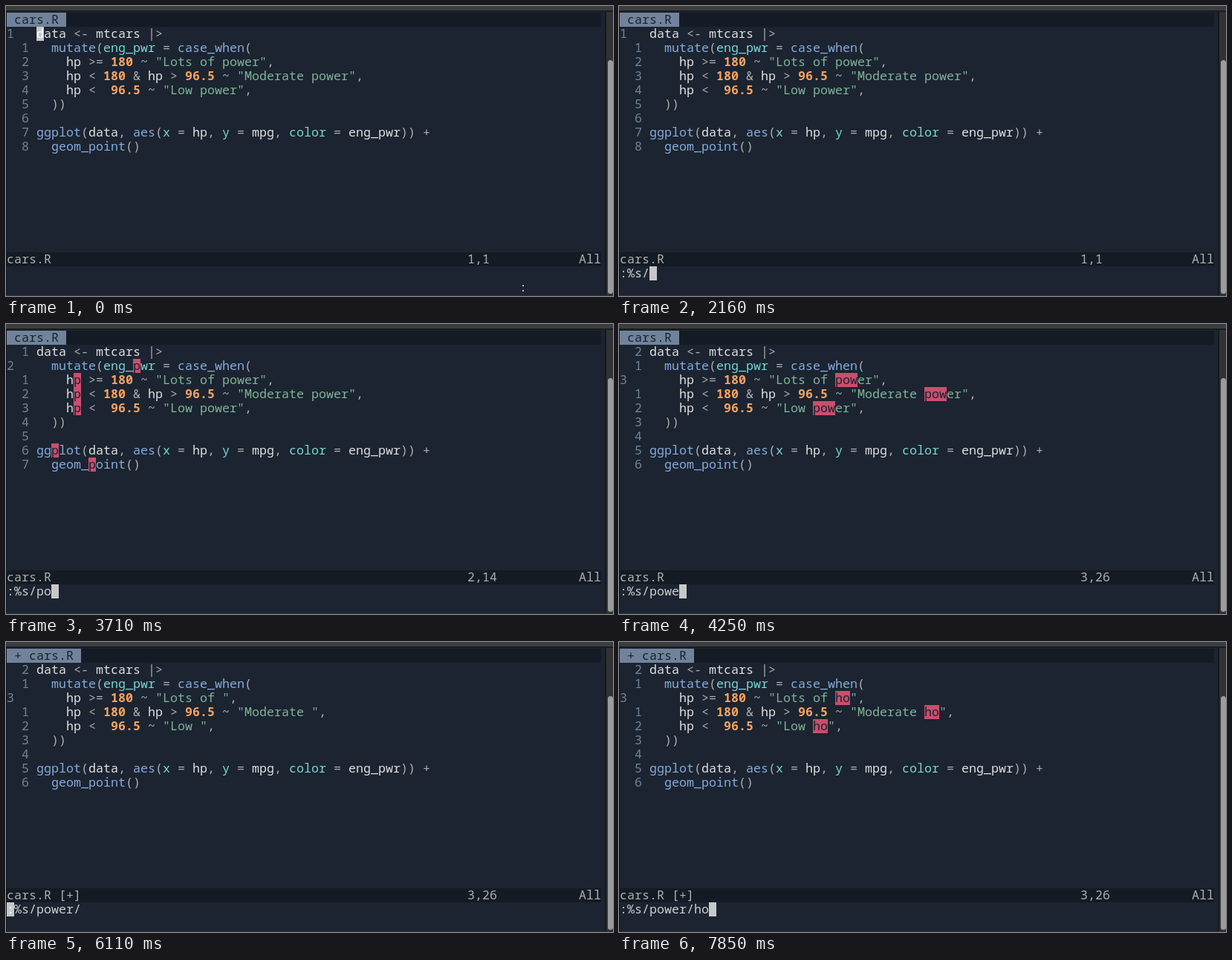
Write an HTML page with a canvas that moves like this. It is 817 px wide and 391 px high and loops after 8 s.

```html
<!DOCTYPE html>
<html lang="en">
<head>
<meta charset="utf-8">
<title>Substitute preview</title>
<style>
html, body { margin: 0; width: 100%; height: 100%; overflow: hidden; background: #1b2430; }
canvas { display: block; }
</style>
</head>
<body>
<canvas id="stage" width="817" height="391"></canvas>
<script>
const ctx = document.getElementById('stage').getContext('2d');
const LOOP = 8000, CELL = 10, ROW = 19, LEFT = 1, TOP = 9;
const C = {
  bg: '#1b2430', bar: '#141b24', fg: '#cdcecf', dim: '#aeafb0', gutter: '#71839b',
  name: '#dfdfe0', call: '#86abdc', arg: '#7ad5d6', number: '#f4a261', string: '#81b29a',
  match: '#c94f6d', cursor: '#c7c8c9'
};

const code = [
  'data <- mtcars |>',
  '  mutate(eng_pwr = case_when(',
  '    hp >= 180 ~ "Lots of power",',
  '    hp < 180 & hp > 96.5 ~ "Moderate power",',
  '    hp <  96.5 ~ "Low power",',
  '  ))',
  '',
  'ggplot(data, aes(x = hp, y = mpg, color = eng_pwr)) +',
  '  geom_point()'
];

// start, command line, search pattern, replacement (null: search only), line, position, cursor column
const steps = [
  [0, '', '', null, 1, '1,1'],
  [1140, ':%', '', null, 1, '1,1'],
  [1640, ':%s', '', null, 1, '1,1'],
  [2160, ':%s/', '', null, 1, '1,1'],
  [3340, ':%s/p', 'data', null, 1, '1,1'],
  [3710, ':%s/po', 'p', null, 2, '2,14'],
  [3920, ':%s/pow', 'po', null, 3, '3,26'],
  [4250, ':%s/powe', 'pow', null, 3, '3,26'],
  [5170, ':%s/power', 'powe', null, 3, '3,26'],
  [6010, ':%s/power/', 'power', null, 3, '3,26'],
  [6110, ':%s/power/', 'power', '', 3, '3,26', 0],
  [6920, ':%s/power/h', 'power', '', 3, '3,26'],
  [7020, ':%s/power/h', 'power', 'h', 3, '3,26'],
  [7750, ':%s/power/ho', 'power', 'h', 3, '3,26'],
  [7850, ':%s/power/ho', 'power', 'ho', 3, '3,26']
];

function rect(x, y, w, h, color) {
  ctx.fillStyle = color;
  ctx.fillRect(x, y, w, h);
}

function fillCells(row, col, count, color) {
  rect(LEFT + col * CELL, TOP + row * ROW, count * CELL, ROW, color);
}

function write(row, col, text, color, weight = 500) {
  ctx.font = weight + ' 16.667px "Noto Sans Mono", "DejaVu Sans Mono", monospace';
  ctx.fillStyle = color;
  [...text].forEach((ch, i) =>
    ctx.fillText(ch, LEFT + (col + i) * CELL, TOP + row * ROW + 15));
}

function writeCode(row, line) {
  const token = /("[^"]*")|(\d+(?:\.\d+)?)|(\w+(?=\())|(\w+(?= = ))|(\w+)|[^\w\s]+?/g;
  const colors = [C.string, C.number, C.call, C.arg, C.name];
  for (const m of line.matchAll(token)) {
    const kind = m.slice(1).findIndex(Boolean);
    write(row, 4 + m.index, m[0], colors[kind] || C.dim, kind === 1 ? 600 : 500);
  }
}

function drawWindow() {
  rect(0, 0, 817, 391, C.bg);
  rect(0, 0, 817, 6, '#3c3d3f');
  rect(0, 6, 817, 2, '#1a1c1f');
  rect(0, 8, 1, 383, '#151b23');
  rect(806, 8, 2, 383, '#15191f');
  rect(808, 8, 9, 383, '#303234');
  ctx.fillStyle = '#9b9c9d';
  ctx.beginPath();
  ctx.roundRect(810, 73, 7, 315, 3.5);
  ctx.fill();
  rect(0, 390, 817, 1, '#30343a');
}

function draw([, cmd, pattern, replacement, current, position, cursor = cmd.length]) {
  const changed = replacement !== null;
  drawWindow();

  const tab = changed ? ' + cars.R ' : ' cars.R ';
  fillCells(0, 0, 80, C.bar);
  fillCells(0, 0, tab.length, C.gutter);
  write(0, 0, tab, '#192330');

  code.forEach((source, i) => {
    const row = i + 1, distance = Math.abs(row - current);
    write(row, distance ? 2 : 0, String(distance || row), C.gutter);
    const at = pattern ? source.indexOf(pattern) : -1;
    const line = changed ? source.replace(pattern, replacement) : source;
    writeCode(row, line);
    if (at >= 0) {
      const found = changed ? replacement : pattern;
      fillCells(row, 4 + at, found.length, C.match);
      write(row, 4 + at, found, '#192330');
    }
  });

  fillCells(17, 0, 80, C.bar);
  write(17, 0, changed ? 'cars.R [+]' : 'cars.R', C.dim);
  write(17, 62, position, C.dim);
  write(17, 77, 'All', C.dim);

  if (cmd) {
    fillCells(18, cursor, 1, C.cursor);
    write(18, 0, cmd, C.fg);
    if (cursor < cmd.length) write(18, cursor, cmd[cursor], '#fff');
  } else {
    fillCells(1, 4, 1, C.cursor);
    write(1, 4, 'd', '#fff');
    write(19, 69, ':', C.fg);
  }
}

const start = performance.now();
function tick() {
  const t = (performance.now() - start) % LOOP;
  draw(steps.findLast(step => step[0] <= t));
  requestAnimationFrame(tick);
}
tick();
</script>
</body>
</html>
```
